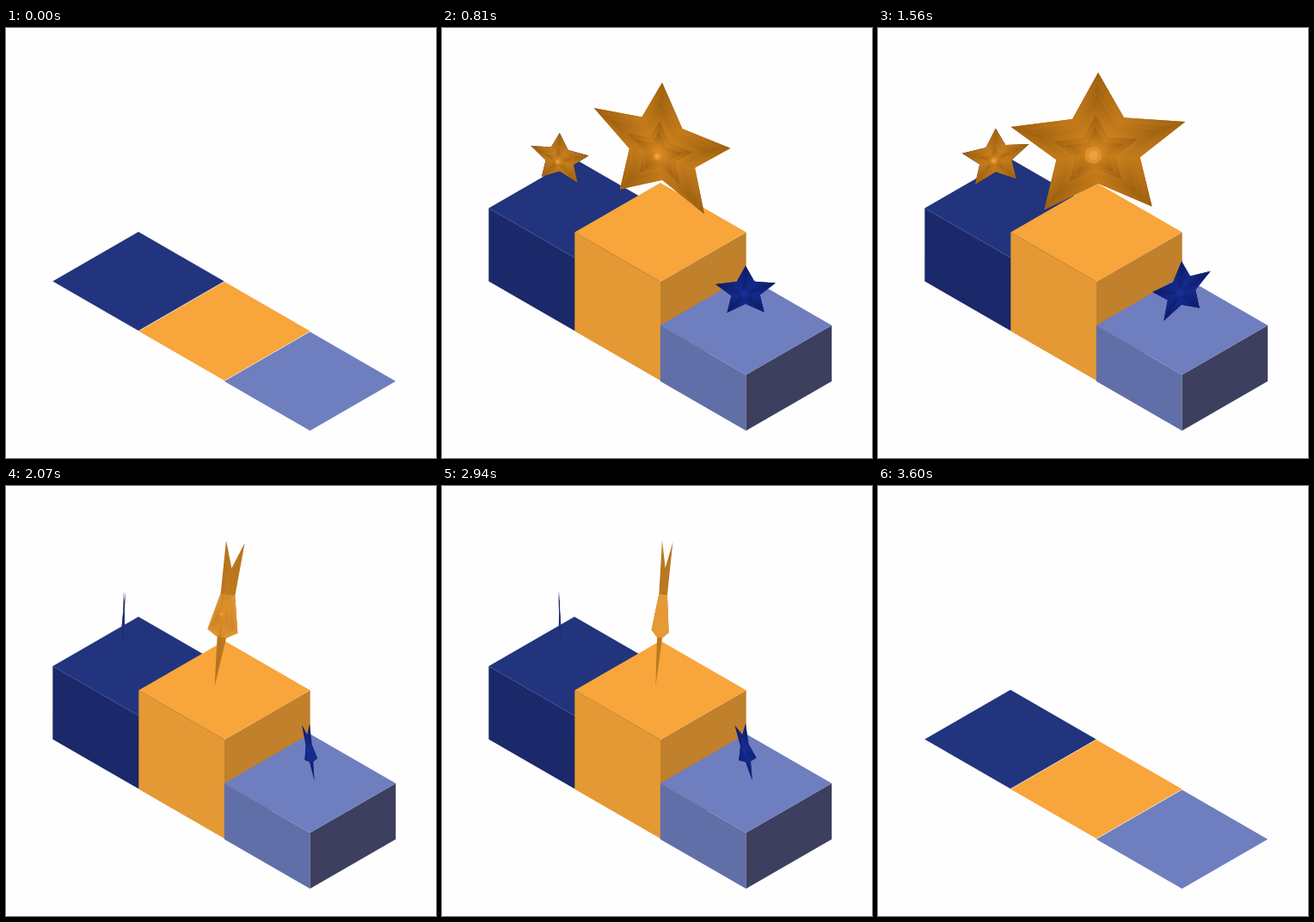
Animation, 500 px wide and 500 px high, one loop 3.66 s. Source, as an HTML page with a canvas:

```html
<!DOCTYPE html>
<html lang="en">
<head>
<meta charset="utf-8">
<title>Podium with spinning stars</title>
<style>
  html, body { margin: 0; width: 100%; height: 100%; overflow: hidden; background: #fefefe; }
  canvas { display: block; }
</style>
</head>
<body>
<canvas id="stage" width="500" height="500"></canvas>
<script>
const ctx = document.getElementById('stage').getContext('2d');
const LOOP = 3660, STEP = 30, END = 3600;
const TILE_W = 99.7, TILE_H = 57.5;

// x, y: back corner of the tile on the ground
const blocks = [
  { x: 154, y: 237, height: 85, delay: 0, top: '#21347d', left: '#1b2869', right: '#151d50' },
  { x: 254, y: 295, height: 115, delay: 141, top: '#f8a53b', left: '#e49935', right: '#c0802c' },
  { x: 353.5, y: 353.3, height: 65, delay: 284, top: '#6e7ebf', left: '#616fa8', right: '#3d3f5e' }
];

const gold = { core: '#d98a20', tip: '#9c5f10' };
const stars = [
  { x: 136.8, y: 152, r: 36.8, phase: 34.5, ...gold, near: '#1f307a', far: '#1a2868', dot: true },
  { x: 256, y: 140, r: 93.6, phase: 45, ...gold, near: '#e69a36', far: '#bb7820', dot: true },
  { x: 353, y: 306.5, r: 36.6, phase: 16, core: '#18309c', tip: '#0c1c68', near: '#172c92', far: '#0f2072' }
];

const clamp = v => Math.min(1, Math.max(0, v));
const ease = v => (1 - Math.cos(Math.PI * clamp(v))) / 2;

// Unit star, clockwise from the top; odd points are the notches.
const points = Array.from({ length: 10 }, (_, i) => {
  const a = i * Math.PI / 5 - Math.PI / 2, r = i % 2 ? 0.48 : 1;
  return [r * Math.cos(a), r * Math.sin(a)];
});
const nearPart = [9, 8, 7, 5, 4, 3].map(i => points[i]);

function polygon(pts, fill) {
  ctx.beginPath();
  pts.forEach(p => ctx.lineTo(...p));
  ctx.closePath();
  ctx.fillStyle = fill;
  ctx.fill();
}

function drawBlock(b, grow) {
  const h = b.height * ease((grow - b.delay) / 443);
  const y = b.y - h;
  const west = [b.x - TILE_W, y + TILE_H], east = [b.x + TILE_W, y + TILE_H];
  const front = [b.x, y + 2 * TILE_H];
  const down = ([px, py]) => [px, py + h];
  if (h > 0) {
    polygon([west, front, down(front), down(west)], b.left);
    polygon([front, east, down(east), down(front)], b.right);
  }
  polygon([[b.x, y], east, front, west], b.top);
}

function drawStar(s, t, grow) {
  const size = ease((grow - 250) / 230);
  if (!size) return;
  const pulse = 1 + 0.2 * ease(1 - Math.abs(t - 1655) / 255);
  const r = s.r * size * pulse;
  const angle = (0.2 * t + s.phase + 5 * ease((t - 1560) / 400)) * Math.PI / 180;
  // Isometric image of the star's horizontal axis, the near arm kept on its left.
  const side = Math.sin(angle) > 0 ? -1 : 1;
  const ux = side * r * Math.cos(angle), uy = side * r * 0.577 * Math.sin(angle);
  const x = s.x, y = s.y - 8 * (pulse - 1) + 52 * (1 - ease((grow - 250) / 390));
  const facing = Math.abs(Math.cos(angle));
  const hubX = -0.06 * s.r * size, hubY = 0.097 * s.r * size;

  const layer = (scale, draw) => {
    ctx.save();
    ctx.transform(ux * scale, uy * scale, 0, 0.817 * r * scale,
      x + hubX * (1 - scale), y + hubY * (1 - scale));
    draw();
    ctx.restore();
  };

  layer(1, () => {
    polygon(points, s.far);
    polygon(nearPart, s.near);
  });

  ctx.globalAlpha = clamp((facing - 0.2) / 0.25);
  for (const scale of [1, 0.86, 0.74, 0.48, 0.34]) {
    layer(scale, () => {
      const shade = ctx.createRadialGradient(0, 0, 0.1, 0, 0, 1);
      shade.addColorStop(0, s.core);
      shade.addColorStop(1, s.tip);
      polygon(points, shade);
    });
  }
  ctx.globalAlpha = 1;

  if (s.dot && (s.r > 50 || facing > 0.2)) {
    const radius = (3 + 7 * facing ** 10) * r / 106;
    for (const [part, color] of [[1, '#df912c'], [0.55, '#eda044']]) {
      ctx.beginPath();
      ctx.arc(x + hubX, y + hubY, radius * part, 0, 7);
      ctx.fillStyle = color;
      ctx.fill();
    }
  }
}

function render() {
  const t = Math.floor(performance.now() % LOOP / STEP) * STEP;
  const grow = Math.max(0, Math.min(t, (END - t) * 1.2));
  ctx.fillStyle = '#fefefe';
  ctx.fillRect(0, 0, 500, 500);
  blocks.forEach(b => drawBlock(b, grow));
  stars.forEach(s => drawStar(s, t, grow));
  requestAnimationFrame(render);
}
render();
</script>
</body>
</html>
```
